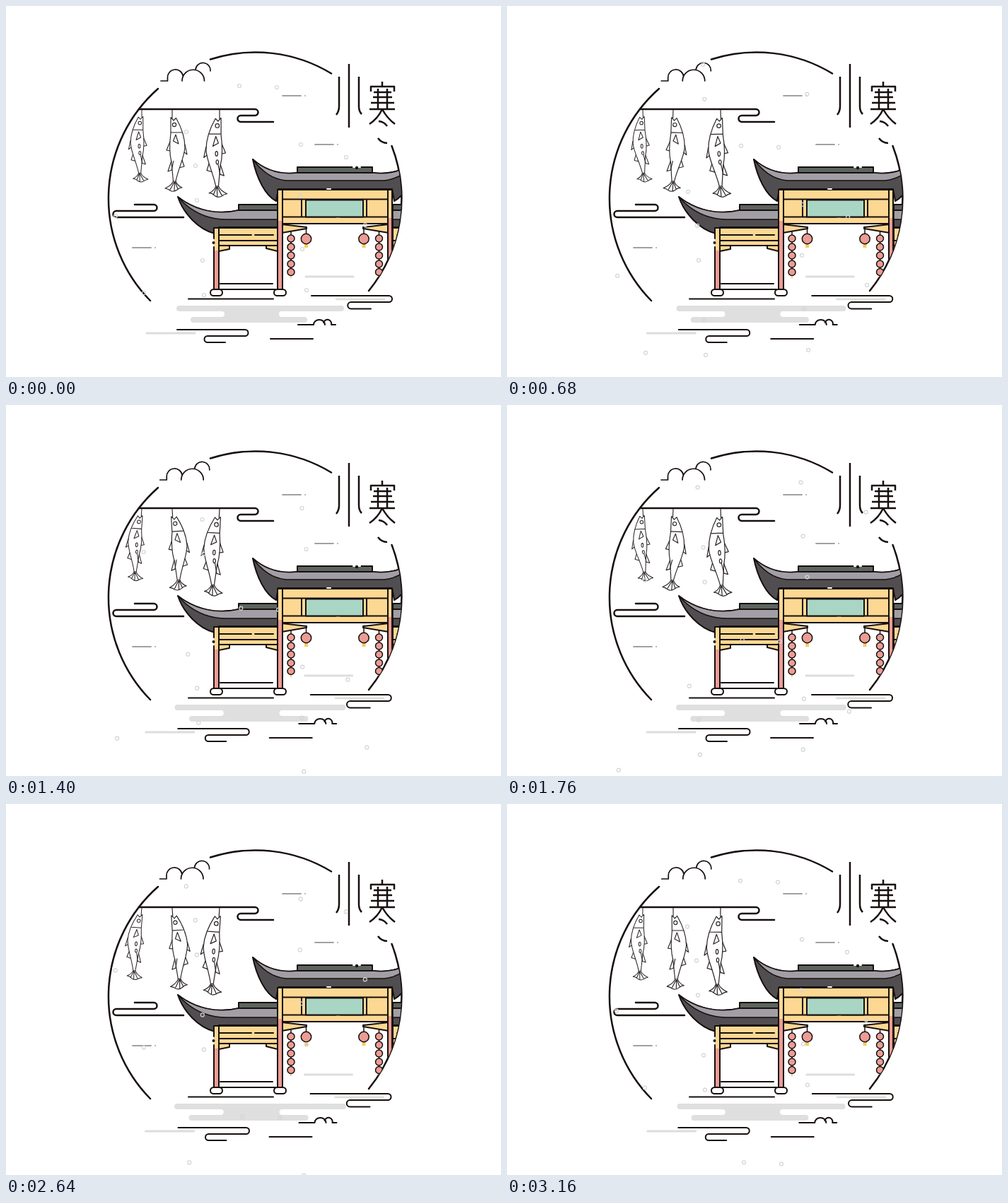
Animation of 700 by 525 pixels, one loop 3.2 s. Source, as an HTML page:

```html
<!DOCTYPE html>
<html lang="zh">
<head>
<meta charset="utf-8">
<title>小寒</title>
<style>
  html, body { margin: 0; width: 100%; height: 100%; overflow: hidden; background: #fff; }
  svg { display: block; width: 700px; height: 525px; }
  .ink { fill: none; stroke: #170f0e; stroke-width: 2; stroke-linecap: round; stroke-linejoin: round; }
  .bold { stroke-width: 2.5; }
  .soft { fill: none; stroke: #ddd; stroke-width: 3; stroke-linecap: round; }
  .wisp { fill: none; stroke: #a2a0a0; stroke-width: 1.8; stroke-linecap: round; }
  .fish { fill: none; stroke: #2b2625; stroke-width: 1.15; stroke-linejoin: round; }
  .flake { fill: none; stroke: #d6d4d4; stroke-width: 1.2; }
  .yellow { fill: #fcd893; }
  .pink { fill: #eb9c94; }
  .green { fill: #a9d6c4; }
  .dark { fill: #504e50; }
  .light { fill: #a19fa5; }
  .ridge { fill: #5d6460; }
  .white { fill: #fff; }
  .plain { stroke: none; }
  .dot { fill: #170f0e; stroke: none; }
</style>
</head>
<body>
<svg viewBox="0 0 700 525">
  <defs>
    <clipPath id="disc"><circle cx="352" cy="273" r="207"/></clipPath>
    <g id="fish">
      <path d="M0 0V12M2 10.5L-2 15L-5.500 11.500C-12 23 -18 36 -18 53C-17 68 -9 82 -5 101M2 10.500V33C4 48 4 62 1 74L-1.500 101M2 32H-14"/>
      <circle cx="-3" cy="21" r="2.600"/>
      <path d="M-5 35L-9 48L-1.500 44ZM-18 49L-21 63L-17 60M-14 71L-17 80L-10 82M3 45L8 57L3 58M1 72L6 87L0 85M-2 72L1 86"/>
      <path d="M-5 101H-1.500Q1 107 10 111Q5 112 3 114Q-2 117 -7 113Q-10 110 -14 110Q-7 107 -5 101M-4 102L-8 112M-3.500 102L-3 115M-3 102L3 113"/>
    </g>
    <g id="spots"><ellipse cx="-4" cy="58" rx="1.600" ry="3.200"/><ellipse cx="-3" cy="69" rx="1.600" ry="2.800"/></g>
  </defs>

  <g id="band">
    <path fill="#dfdfdf" d="M302 431H392V441H302Z"/>
    <path class="soft" style="stroke:#dfdfdf;stroke-width:8" d="M245 428H474M265 444H422"/>
    <path class="soft" style="stroke:#fff;stroke-width:8" d="M260 436H305M390 436H432"/>
  </g>

  <path class="ink bold" d="M289 75.500A207 207 0 0 1 460 95.500M215 117A207 207 0 0 0 204 417M545.500 198A207 207 0 0 1 513 403"/>
  <path class="ink bold" d="M188 146H352A4.500 4.500 0 0 1 352 155H332A4.500 4.500 0 0 0 332 164H378"/>
  <path class="ink bold" d="M182 281H209A4.500 4.500 0 0 1 209 290H156A4.500 4.500 0 0 0 156 299H251"/>
  <path class="wisp" d="M391 127H417M423 127h.1M437 196H463M469 196h.1M179 342H205M211 342h.1"/>

  <g class="ink bold" style="stroke-linecap:butt">
    <path d="M485 82V172M471 100V142Q471 149 467 154M499 100V142Q499 149 503 153"/>
    <path d="M532 107V114M516 121V114H549V121M520 122H545M519 129H546M516 137H549M526 117V146M539 117V146M514 146H550"/>
    <path d="M532 146Q526 159 514 167M532 146Q539 159 550 167M527 163Q535 164 539 170M526 187Q531 194 539 194"/>
  </g>

  <g clip-path="url(#disc)" class="ink">
    <g id="side">
      <path class="yellow" d="M301 314H384V339H301Z"/>
      <path d="M301 324H347M352 324H378M301 332H384"/>
      <path class="yellow" d="M301 339H316V344L301 347ZM384 339H368V343L384 347Z"/>
      <path class="dark" d="M243 270C251 294 272 316 295 322L301 313H384V289H329C300 296 268 290 243 270Z"/>
      <path class="light" stroke-width="1.500" d="M243 270C268 290 300 296 329 289H384V302H312C284 302 262 292 243 270Z"/>
      <path class="ridge" d="M329 281H384V289H329Z"/>
      <path class="yellow plain" d="M294 314H301V348H294Z"/>
      <path class="pink plain" d="M294 346H301V401H294Z"/>
      <path d="M294 314H301V401H294V341M294 329V314"/>
      <circle class="dot" cx="293.500" cy="335" r="2"/>
      <path d="M303 393H377M303 401H381"/>
    </g>
    <use href="#side" transform="translate(931) scale(-1 1)"/>

    <!-- main gate -->
    <path class="yellow" d="M390 309L425 313V315L390 321ZM541 309L505 313V315L541 321Z"/>
    <path class="yellow" d="M390 260H541V308H390Z"/>
    <path d="M390 273.500H541M390 298.500H466M473 298.500H541M418 274V298M510 274V298"/>
    <path class="green" d="M424 274.500H505V298.500H424Z"/>
    <path class="dark" d="M349 217C354 242 366 268 382 276L385 259H546L549 276C565 268 577 242 582 217C565 232 543 239 519 236H412C388 239 366 232 349 217Z"/>
    <path class="light" stroke-width="1.500" d="M349 217C366 232 388 239 412 236H519C543 239 565 232 582 217C569 234 555 245 535 247H396C376 245 362 234 349 217Z"/>
    <path class="ridge" d="M412 228H518V236H412Z"/>
    <path stroke="#fff" d="M491 228H501M454 259H459"/>
    <circle class="dot" cx="496" cy="229" r="2.200"/>
    <path class="yellow plain" d="M384 260H391V306H384ZM540 260H546V302H540Z"/>
    <path class="pink plain" d="M384 304H391V401H384ZM540 300H546V401H540Z"/>
    <path d="M384 260H391V401H384ZM540 260H546V401H540Z"/>
    <g id="lanterns" stroke-width="1.500"></g>
  </g>
  <rect class="ink white" x="289" y="401" width="17" height="9" rx="4.500"/>
  <rect class="ink white" x="379" y="401" width="17" height="9" rx="4.500"/>
  <path class="ink" d="M258 414.500H378"/>

  <g class="left">
    <path class="ink" style="stroke-width:1.700" d="M219 106H228.500V102A11 11 0 0 1 250.500 100M249 106A15.700 15.700 0 0 1 280.500 106M268 90A10.500 10.500 0 0 1 289 92"/>
    <path class="ink" d="M432 410H541.500A4.500 4.500 0 0 1 541.500 419H488A4.500 4.500 0 0 0 488 428.500H516M374 471H434"/>
    <path class="soft" d="M199 463H267M424 383H491"/>
    <path class="soft" style="stroke:#d9e2dc;stroke-width:2.500" d="M467 415H535"/>
  </g>
  <g class="right ink">
    <path d="M242 458H338A4.500 4.500 0 0 1 338 467H285A4.500 4.500 0 0 0 285 476H310"/>
    <path d="M413 451H435A8 7 0 0 1 451 451M449 448A5 5 0 0 1 460 451H466"/>
  </g>

  <g id="shoal"></g>
  <g id="snowLow"></g>
  <g clip-path="url(#disc)"><g id="snowHigh"></g></g>
</svg>
<script>
const LOOP = 3200, STEP = 40;
const $ = id => document.getElementById(id);
const repeat = (list, draw) => list.map(draw).join('');

const ball = (x, y, r) => `<circle class="pink" cx="${x}" cy="${y}" r="${r}"/>`;
const tassel = (x, y, h) => `<path class="plain" fill="#f0cd62" d="M${x - 2.5} ${y}h5v${h}h-5Z"/>`;
$('lanterns').innerHTML =
  repeat([424.5, 506], x => `<path d="M${x} 315V323"/>${tassel(x, 337, 5)}${ball(x, 329.5, 7.2)}`) +
  repeat([403, 527.5], x => `<path d="M${x} 319V381"/><path stroke="#f0cd62" d="M${x} 382v3"/>` +
    repeat([329, 341, 353, 365, 376.5], y => ball(x, y, 5)));

// hook x, horizontal scale, vertical scale, swing in degrees
const fish = [[192, .885, .885, -8.3], [235, -1, 1, 6.5], [302, 1.06, 1.07, -6.4]];
$('shoal').innerHTML = repeat(fish, ([x, sx, sy]) =>
  `<g class="fish"><g transform="scale(${sx} ${sy})"><use href="#fish"/>${sx > 0 ? '<use href="#spots"/>' : ''}</g></g>`);
const swimmers = [...$('shoal').children];

// flake positions at the start of the loop
const flakes = [
  [330, 113], [383, 115], [255, 178], [417, 196], [481, 214], [268, 226], [416, 268], [270, 275],
  [155, 297], [508, 310], [419, 344], [278, 360], [425, 402], [195, 406], [280, 409]
];
$('snowLow').innerHTML = $('snowHigh').innerHTML =
  repeat(flakes, ([x, y]) => `<circle class="flake" cx="${x}" cy="${y}" r="2.5"/>`);

const move = (el, x, y = 0) => el.setAttribute('transform', `translate(${x} ${y})`);
const leftward = document.querySelector('.left'), rightward = document.querySelector('.right');

function draw(now) {
  const t = Math.floor(now % LOOP / STEP) * STEP;
  const swing = Math.asin(Math.sin(t * Math.PI / 800)) * 2 / Math.PI;
  const sway = Math.abs(swing);

  swimmers.forEach((el, i) =>
    el.setAttribute('transform', `translate(${fish[i][0]} 147) rotate(${fish[i][3] * swing})`));
  move(leftward, -2.5 * sway);
  move(rightward, 2.5 * sway);
  $('band').setAttribute('transform', `translate(360 436) scale(${1 + .042 * sway} 1) translate(-360 -436)`);
  move($('snowLow'), .0016 * t, .1248 * t);
  move($('snowHigh'), .0003 * (t - LOOP), .11 * (t - LOOP));
  requestAnimationFrame(() => draw(performance.now()));
}
draw(0);
</script>
</body>
</html>
```
